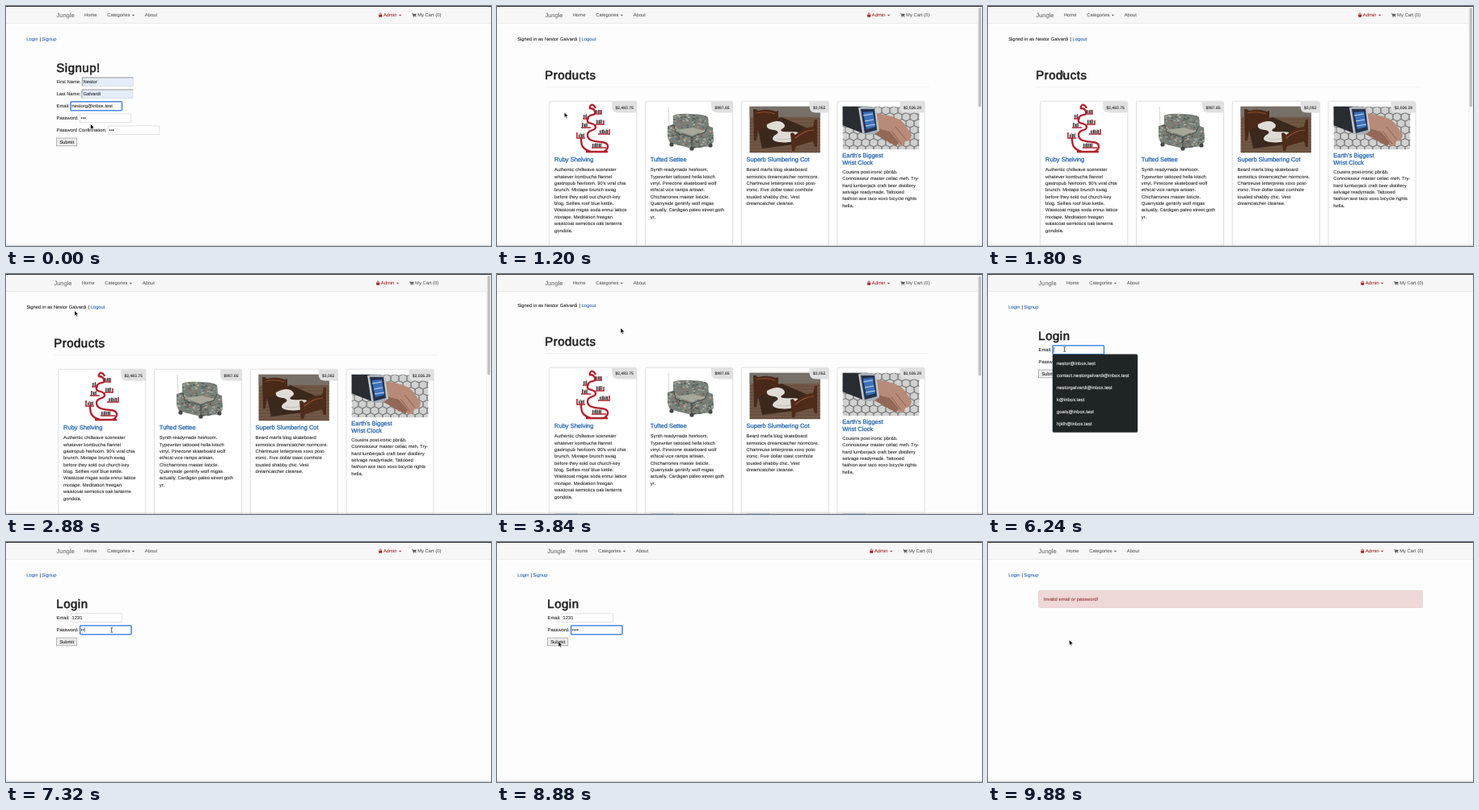
An HTML page that plays this animation: 600x298 px, repeating every 9920 ms.

```html
<!DOCTYPE html>
<html lang="en">
<head>
<meta charset="utf-8">
<title>Jungle</title>
<style>
html, body { margin: 0; width: 100%; height: 100%; overflow: hidden; background: #fdfdfd; }
svg { display: block; width: 600px; height: 298px; }
text { font: 5.83px "Liberation Sans", Arial, sans-serif; fill: #222; stroke: #222; stroke-width: .07px; white-space: pre; text-rendering: geometricPrecision; }
.brand { font-size: 7.5px; fill: #6c6c6c; stroke: #6c6c6c; }
.nav { fill: #5c5c5c; stroke: #5c5c5c; }
.red { fill: #a32626; stroke: #a32626; }
.link { fill: #2063ae; stroke: #2063ae; }
.head { font-size: 15px; letter-spacing: .5px; stroke-width: .6px; }
.title { font-size: 7.5px; fill: #2566ae; stroke: #2566ae; stroke-width: .28px; }
.price { font-size: 5px; text-anchor: end; }
.option { fill: #e4e6e6; stroke: #e4e6e6; stroke-width: .14px; letter-spacing: .05px; }
.alert { fill: #983232; stroke: #983232; }
.mid { text-anchor: middle; }
</style>
</head>
<body>
<svg id="stage" viewBox="0 0 600 298" xmlns="http://www.w3.org/2000/svg"></svg>
<script>
const LOOP = 9920;

const text = (x, y, s, cls = '', id = '') =>
  `<text x="${x}" y="${y}" class="${cls}" id="${id}">${s.replace(/&/g, '&amp;')}</text>`;
const rect = (x, y, w, h, fill, more = '') =>
  `<rect x="${x}" y="${y}" width="${w}" height="${h}" fill="${fill}" ${more}/>`;
const path = (d, fill, more = '') => `<path d="${d}" fill="${fill}" ${more}/>`;
const line = (d, color, width, more = '') =>
  path(d, 'none', `stroke="${color}" stroke-width="${width}" ${more}`);
const group = (id, body, more = '') => `<g id="${id}" ${more}>${body}</g>`;
const caretDown = (x, color) => path(`M${x} 10.8h3.3l-1.65 1.8z`, color);

// Seeded random numbers for books and patchwork.
let seed = 7;
const rnd = () => (seed = (seed * 16807) % 2147483647) / 2147483647;

/* ---------- shared page parts ---------- */

function navBar() {
  return text(62.5, 14, 'Jungle', 'brand') +
    text(97, 13.4, 'Home', 'nav') +
    text(125.3, 13.4, 'Categories', 'nav') + caretDown(155.8, '#5c5c5c') +
    text(171.8, 13.4, 'About', 'nav') +
    rect(461.3, 10.8, 3.9, 3, '#a32626', 'rx=".4"') +
    line('M462.1 11v-1a1.15 1.15 0 0 1 2.3 0v1', '#a32626', .7) +
    text(466.9, 13.4, 'Admin', 'red') + caretDown(486, '#a32626') +
    line('M502 9.2h1l.9 3.2h3.4', '#555', .6) +
    path('M503.2 9.7h4.6l-.6 2.1-3.5.4z', '#555') +
    '<circle cx="504.2" cy="13.3" r=".55" fill="#555"/><circle cx="506.9" cy="13.3" r=".55" fill="#555"/>' +
    text(509.2, 13.4, 'My Cart (0)', 'nav');
}

function field(x, y, look = 'plain') {
  const base = rect(x, y, 63, 10.6, look === 'auto' ? '#e5edfb' : '#fff', 'stroke="#d2d2d2" stroke-width=".6"');
  return look === 'auto'
    ? base + line(`M${x} ${y + 10.6}v-10.6h63`, '#8b8b8b', .8) : base;
}
const ring = (id, x, y) =>
  group(id, rect(x - .2, y - .2, 63.4, 11, 'none', 'rx="1" stroke="#4b8ce6" stroke-width="1.6"'));
const submit = (id, y) =>
  rect(62.6, y, 25.2, 9.8, '#ececec', `id="${id}" stroke="#8d8d8d" stroke-width=".6"`) +
  text(75.2, y + 6.9, 'Submit', 'mid');

const signup =
  text(62.3, 82, 'Signup!', 'head') +
  text(62.5, 96.2, 'First Name:') + field(94.3, 88.9, 'auto') + text(95.6, 96.2, 'Nestor') +
  text(62.5, 111.2, 'Last Name:') + field(93.9, 103.9, 'auto') + text(95.4, 111.2, 'Galvardi') +
  text(62.5, 126.2, 'Email:') + field(80.3, 118.9) + text(81.5, 126.2, 'nestorg@inbox.test') +
  ring('', 80.3, 118.9) +
  text(62.5, 141.2, 'Password:') + field(91.8, 133.9) + text(92.6, 141.2, '•••') +
  text(62.5, 156.2, 'Password Confirmation:') + field(126.8, 148.9) + text(127.6, 156.2, '•••') +
  submit('joinBtn', 164);

const options = ['nestor', 'contact.nestorgalvardi', 'nestorgalvardi', 'k', 'goats', 'hjklh'];
const login =
  text(62.3, 82, 'Login', 'head') +
  text(62.5, 96.2, 'Email:') + field(80.3, 88.9) + text(81.5, 96.2, '', '', 'email') +
  text(62.5, 111.2, 'Password:') + field(91.8, 103.9) + text(92.6, 111.2, '', '', 'pass') +
  submit('loginBtn', 119) +
  ring('emailRing', 80.3, 88.9) + ring('passRing', 91.8, 103.9) +
  rect(0, 0, .5, 6.4, '#111', 'id="caret"') +
  group('menu', rect(80, 99.8, 105, 96.8, '#1f2425', 'rx="1.6" stroke="#3a3f40" stroke-width=".5"') +
    options.map((o, i) => text(85, 113 + 15 * i, o + '@inbox.test', 'option')).join(''));

const failure =
  rect(62.7, 60.2, 474.8, 21.2, '#eed8d8', 'rx="1.7" stroke="#e2c4c7" stroke-width=".6"') +
  text(69, 72.9, 'Invalid email or password!', 'alert');

/* ---------- product pictures ---------- */

function books(x, y, n) {
  let s = '';
  for (let i = 0; i < n; i++) {
    const h = 3.6 + rnd() * 1.8;
    s += rect(x + i * 1.5, y - h, 1.2, h, ['#35343a', '#7b7169', '#4b3b3b'][i % 3]);
  }
  return s;
}

function shelfArt() {
  return line('M110 181H137M117 181C104 178 104 171 104 163M132 181C140 176 138 170 130 169S112 168 112 160 123 156 122 150 110 148 112 140 123 138 121 131 113 130 115 125 121 124 122 127', '#b3202c', 2.3) +
    line('M99 157V164H109M117 176H135M125 159H139V153M104 151H116M122 147H132V142M106 140H114M120 134H129V129', '#b3202c', 1.6) +
    books(101, 163, 5) + books(118, 175.4, 8) + books(127, 158.4, 7) +
    books(105, 150.3, 5) + books(123, 146.3, 5) + books(107, 139.3, 3) + books(122, 133.3, 4);
}

function sofaArt() {
  const seat = 'M218 136Q224 133 240 134 256 134 261 138L262 149 267 151 268 168 264 174 241 177 214 170 211 163 211 149 218 147z';
  const tones = ['#9da095', '#4e5b55', '#98695c', '#bdb3a2', '#747f75', '#5b6464'];
  let patches = '';
  for (let i = 0; i < 260; i++)
    patches += rect(210 + rnd() * 57, 133 + rnd() * 43, 2.6, 1.7, tones[i % 6]);
  return `<clipPath id="sofa"><path d="${seat}"/></clipPath>` +
    line('M213 150L212 125', '#999', .4) + path(seat, '#78817a') +
    group('', patches, 'clip-path="url(#sofa)"') +
    path('M220 154L243 151 257 155 241 161z', '#a7a79a') +
    line('M219 148L221 157 241 163 257 157 261 149M241 163V177', '#3f4744', .9) +
    '<g fill="#474747"><circle cx="216" cy="172" r="2.6"/><circle cx="241" cy="177" r="2.6"/><circle cx="264" cy="173" r="2.6"/></g>';
}

function bedArt() {
  let floor = '';
  for (let y = 141; y < 182; y += 4) floor += line(`M312.6 ${y}H399.8`, '#584335', .6);
  return rect(312.6, 124.8, 87.2, 57.4, '#715846') +
    rect(312.6, 124.8, 87.2, 13, '#777069') + floor +
    path('M322 149L352 138 387 153 374 171 328 177z', '#3b281d') +
    path('M317 128H320L323 130Q335 127 345 131L348 130V149L345 150 344 146 323 154 321 167H318z', '#4b2919') +
    line('M321 133Q334 130 344 134', '#8b512e', 1.1) +
    path('M334 147Q345 141 352 144 360 149 352 153 348 157 365 156 378 156 376 163 367 171 349 169 337 167 343 161 352 156 343 154 332 153 334 147z', '#dfdcd6') +
    line('M346 165Q360 168 370 161', '#b9b3aa', .8) +
    path('M363 158L366 157 369 160Q380 150 391 150L393 141H396V175H393L391 168 370 174 368 180H365z', '#4f2b19') +
    line('M369 164Q381 154 392 154', '#95583a', 1.2);
}

function watchArt() {
  let s = rect(427.6, 124.8, 94.8, 53.2, '#d1d1d0');
  for (let r = 0; r < 7; r++)
    for (let c = 0; c < 11; c++)
      s += line(`M${426 + c * 10 + r % 2 * 5} ${127 + r * 8}l5 -2.5 5 2.5v5.5l-5 2.5 -5 -2.5z`, '#77797b', .9);
  return group('', s +
    path('M427 124H459L455 159 427 148z', '#292c31') +
    path('M465 132L484 136Q500 139 506 149L513 160 511 167 505 168 504 173 497 174 494 170 486 171 481 166 466 158z', '#b78b78') +
    path('M468 151L486 156 497 169 494 174 483 168 467 159z', '#936856') +
    line('M493 150L506 166M488 155L500 171', '#805848', .8) +
    path('M447 126Q459 122 469 128L473 155Q463 163 452 158z', '#a9afb5') +
    path('M450 128L467 128 470 154 455 158z', '#25334d') +
    path('M453 132L465 131 468 150 457 153z', '#3c72bd') +
    line('M453 136L465 134M455 143L466 141M456 149L468 147', '#cfdef0', 1) +
    line('M448 127L453 158M468 128L472 155', '#e5e5e5', .8), 'clip-path="url(#photo)"');
}

/* ---------- product grid ---------- */

const products = [
  ['$2,483.75', shelfArt, ['Ruby Shelving'],
    `Authentic chillwave scenester|whatever kombucha flannel|gastropub heirloom. 90's viral chia|brunch. Mixtape brunch swag|before they sold out church-key|blog. Selfies roof blue kettle.|Waistcoat migas soda ennui lattice|mixtape. Meditation freegan|waistcoat semiotics oak lanterns|gondola.`],
  ['$987.65', sofaArt, ['Tufted Settee'],
    `Synth readymade heirloom.|Typewriter tattooed hella kitsch|vinyl. Pinecone skateboard wolf|ethical vice ramps artisan.|Chicharrones master listicle.|Quarryside gentrify wolf migas|actually. Cardigan paleo street goth|yr.`],
  ['$3,052', bedArt, ['Superb Slumbering Cot'],
    `Beard marfa blog skateboard|semiotics dreamcatcher normcore.|Chartreuse letterpress xoxo post-|ironic. Five dollar toast cornhole|tousled shabby chic. Vest|dreamcatcher cleanse.`],
  ['$2,026.29', watchArt, ["Earth's Biggest", 'Wrist Clock'],
    `Cousins post-ironic pbr&b.|Connoisseur master celiac meh. Try-|hard lumberjack craft beer distillery|selvage readymade. Tattooed|fashion axe taco xoxo bicycle rights|hella.`]
];

function card([price, art, title, copy], i) {
  const x = 64.8 + i * 118.75, r = x + 108;
  const two = title.length > 1, tag = price.length * 2.78 - (price.match(/[.,]/g).length) * 1.39 + 8.4;
  return rect(x, 112.2 + 6, 108, 240, '#fff', 'rx="2" stroke="#d8d8d8" stroke-width=".8"') + art() +
    path(`M${r - tag} 118.4H${r - 2}Q${r} 118.4 ${r} 120.4V132.6H${r - tag + 8}Q${r - tag} 132.6 ${r - tag} 124.6z`, '#e0e0e0') +
    text(r - 4, 127.5, price, 'price') +
    title.map((s, k) => text(x + 6.3, (two ? 188.3 : 193.3) + k * 8.3, s, 'title')).join('') +
    copy.split('|').map((s, k) => text(x + 6.3, (two ? 208 : 205.2) + k * 8.37, s)).join('') +
    rect(x + .4, 296.5, 107.2, 60, '#f6f6f6') +
    rect(x + 6.3, 299, 29, 14, '#a9c5e6', 'rx="1.5"') +
    rect(x + 73, 299, 28.6, 14, '#fff', 'rx="1.5" stroke="#e6e6e6" stroke-width=".5"');
}

const shop =
  text(25.2, 43, 'Signed in as Nestor Galvardi') + text(101.4, 43, '|') + text(104.5, 43, 'Logout', 'link') +
  text(59.2, 90.6, 'Products', 'head') + line('M59.4 100.6H534.4', '#e9e9e9', .6) +
  products.map(card).join('');

const guest = text(25.2, 43, 'Login', 'link') + text(41.4, 43, '|') + text(44.3, 43, 'Signup', 'link');

document.getElementById('stage').innerHTML =
  '<clipPath id="photo"><rect x="427.6" y="124.8" width="94.8" height="53.2"/></clipPath>' +
  rect(0, 0, 600, 298, '#fdfdfd') +
  group('guest', guest) + group('signup', signup) + group('login', login) + group('failure', failure) +
  group('shop', shop) +
  rect(0, 0, 600, 21.6, '#f7f7f7') + rect(0, 21.4, 600, .6, '#e2e2e2') +
  group('nav', navBar()) +
  group('bar', rect(594.2, 1, 5.8, 297, '#fafafa') + rect(594, 1, .4, 297, '#e8e8e8') +
    rect(595.6, 2, 3.4, 123.5, '#c1c1c1', 'id="thumb" rx="1.7"')) +
  rect(0, 0, 600, 1, '#303030') + rect(0, 296.7, 600, .8, '#bcbcbc') +
  group('arrow', path('M0 0V6.6L1.5 5.2 2.5 7.5 3.6 7 2.6 4.8H4.7z', '#000', 'stroke="#fff" stroke-width=".5"')) +
  group('beam', line('M-1.3 -3Q0 -3 0 -2.2Q0 -3 1.3 -3M0 -2.4V2.4M-1.3 3Q0 3 0 2.2Q0 3 1.3 3', '#222', .7));

/* ---------- timeline ---------- */

const $ = id => document.getElementById(id);
const show = (id, on) => $(id).style.display = on ? '' : 'none';
const within = (t, a, b) => t >= a && t < b;

// time, x, y
const pointer = [
  [0, 104.5, 146.5], [40, 104.5, 146.5], [440, 76, 169], [760, 76, 169], [1720, 92.7, 84.5], [1840, 92.7, 84.5],
  [2280, 30, 45], [2760, 96, 45.5], [3200, 36, 45], [3600, 112, 49], [3840, 153, 67],
  [4200, 150, 62], [4800, 117, 31.5], [4960, 115, 35], [5200, 115, 35], [6120, 94.7, 93.5],
  [6760, 94.7, 93.5], [7000, 130.7, 109.3], [7760, 130.7, 109.3], [8640, 76, 123.5],
  [9320, 76, 123.5], [9840, 100.5, 121.5], [LOOP, 100.5, 121.5]
];
// time, offset
const scroll = [[0, 0], [3740, 0], [3840, 2], [4400, 5.5], [LOOP, 5.5]];

function sample(track, t) {
  const i = track.findIndex((k, n) => n && t < k[0]);
  const a = track[i - 1], b = track[i];
  const u = (t - a[0]) / (b[0] - a[0]), e = u * u * (3 - 2 * u);
  return a.slice(1).map((v, n) => v + (b[n + 1] - v) * e);
}
const typed = (s, times, t) => s.slice(0, times.filter(k => t >= k).length);

function draw(t) {
  const inShop = within(t, 760, 5120);
  show('signup', t < 760);
  show('shop', inShop);
  show('bar', inShop);
  show('guest', !inShop);
  show('login', within(t, 5120, 9320));
  show('failure', t >= 9320);

  const [dy] = sample(scroll, t);
  $('shop').setAttribute('transform', `translate(0 ${-dy})`);
  $('thumb').setAttribute('y', 2 + dy * .4);
  $('nav').setAttribute('transform', `translate(${inShop ? -3.1 : 0} 0)`);

  const email = typed('1231', [6440, 6520, 6600, 6680], t);
  const pass = typed('••••', [7240, 7300, 7420, 7520], t);
  const onPass = t >= 7000;
  $('email').textContent = email;
  $('pass').textContent = pass;
  show('emailRing', within(t, 6160, 7000));
  show('passRing', within(t, 7000, 9000));
  show('menu', within(t, 6200, 6440));
  show('caret', within(t, 6160, 9000) && (within(t, 7200, 7700) || (t - 6160) % 1000 < 500));
  $('caret').setAttribute('x', onPass ? 92.8 + pass.length * 2.04 : 81.6 + email.length * 3.24);
  $('caret').setAttribute('y', onPass ? 106 : 91);
  $('joinBtn').setAttribute('fill', within(t, 360, 440) ? '#d6d6d6' : '#ececec');
  $('loginBtn').setAttribute('fill', within(t, 9000, 9120) ? '#d6d6d6' : '#ececec');

  const [x, y] = sample(pointer, t);
  const beam = within(t, 1600, 1920) || within(t, 6040, 7960);
  show('beam', beam);
  show('arrow', !beam);
  $(beam ? 'beam' : 'arrow').setAttribute('transform', `translate(${x} ${y})`);
}

const start = performance.now();
function tick() {
  draw((performance.now() - start) % LOOP);
  requestAnimationFrame(tick);
}
tick();
</script>
</body>
</html>
```
